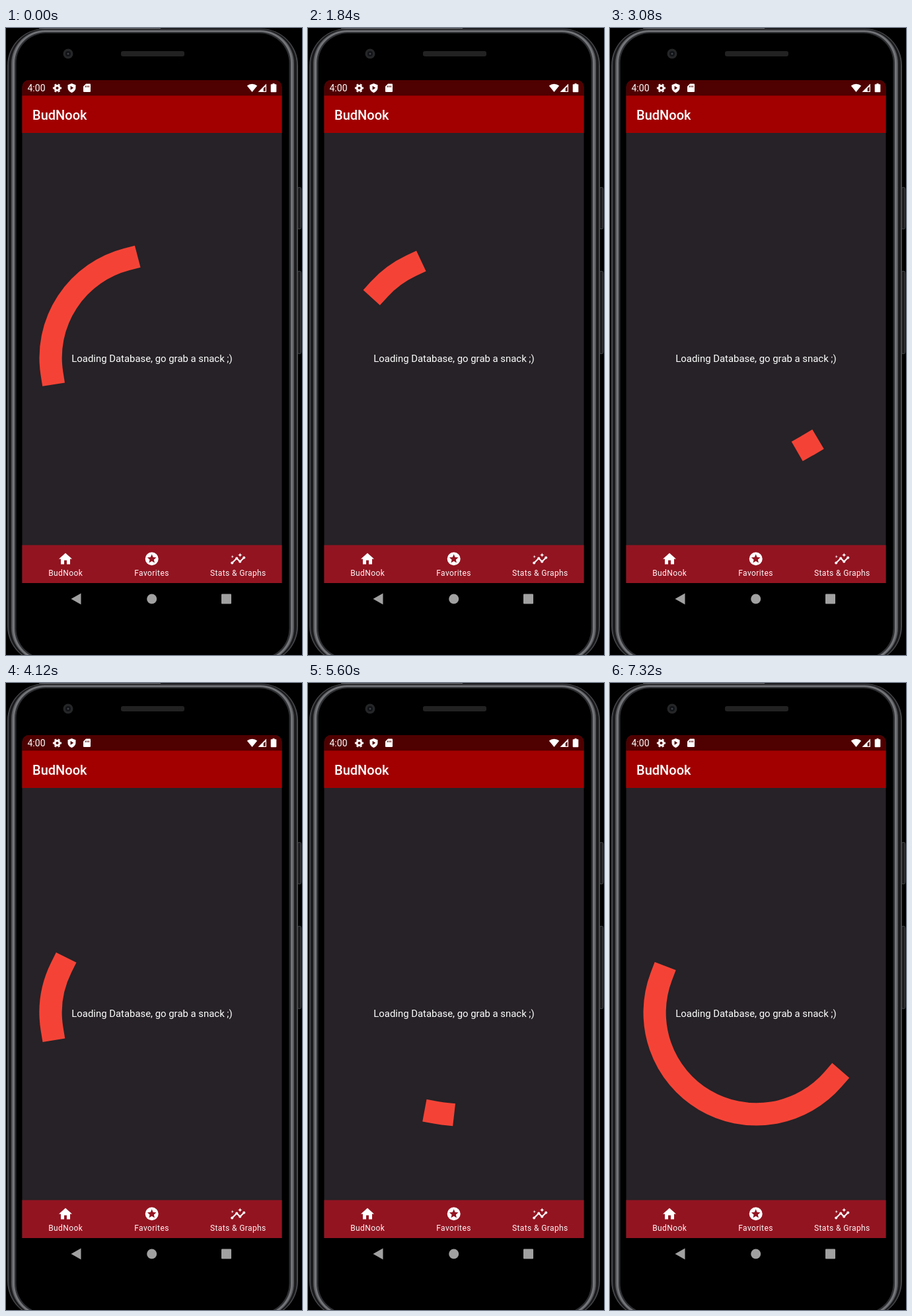
An HTML page that plays this animation: 448x950 px, repeating every 7.36 s.

```html
<!DOCTYPE html>
<html lang="en">
<head>
<meta charset="utf-8">
<title>Loading screen</title>
<style>
  html, body { margin: 0; width: 100%; height: 100%; overflow: hidden; background: #000; }
  svg { display: block; width: 448px; height: 950px; }
  text { font-family: Roboto, "Noto Sans", sans-serif; fill: #fff; }
  .title { font-size: 20px; font-weight: 500; }
  .message { font-size: 14.9px; text-anchor: middle; }
  .tabs text { font-size: 12px; letter-spacing: .0333em; text-anchor: middle; fill: #fdf6f7; }
  .tabs path, .tabs circle { fill: #fff; }
</style>
</head>
<body>
<svg viewBox="0 0 448 950">
  <defs>
    <clipPath id="screen"><path d="M24.5 841V89a10 10 0 0 1 10-10H407.500a10 10 0 0 1 10 10V841z"/></clipPath>
  </defs>

  <!-- phone body: nested bands of the metal rim -->
  <g fill="#1d1d1f" stroke="#4a4b4f">
    <rect x="441.5" y="241.5" width="5" height="63" rx="2"/>
    <rect x="441.5" y="368.5" width="5" height="125" rx="2"/>
  </g>
  <rect x="50" y="0" width="184" height="1" fill="#55575b"/>
  <rect x="2" y="1" width="440" height="961" rx="56" fill="#48494d"/>
  <rect x="4" y="2" width="436" height="959" rx="54" fill="#1b1b1d"/>
  <rect x="8" y="3" width="428" height="957" rx="51" fill="#55575b"/>
  <rect x="10" y="4" width="424" height="955" rx="49" fill="#737579"/>
  <rect x="13" y="6" width="418" height="951" rx="47" fill="#2f3033"/>
  <rect x="15.500" y="8" width="413" height="947" rx="45" fill="#000"/>

  <rect x="174" y="35" width="96" height="8" rx="3" fill="#222223"/>
  <circle cx="94" cy="39" r="7.5" fill="#252628"/>
  <circle cx="94" cy="39" r="4" fill="#111316"/>
  <circle cx="94" cy="39" r="1.5" fill="#3d4148"/>

  <!-- app screen -->
  <g clip-path="url(#screen)">
    <rect x="24" y="79" width="394" height="762" fill="#262227"/>
    <rect x="24" y="79" width="394" height="24" fill="#4f0000"/>
    <rect x="24" y="102.500" width="394" height="56.500" fill="#a20000"/>
    <rect x="24" y="783.500" width="394" height="57.500" fill="#931421"/>
  </g>

  <!-- status bar -->
  <text x="32.5" y="96" font-size="14">4:00</text>
  <g fill="#fff">
    <circle cx="77.5" cy="91" r="3.6" fill="none" stroke="#fff" stroke-width="3"/>
    <circle cx="77.5" cy="91" r="5.7" fill="none" stroke="#fff" stroke-width="1.8"
      pathLength="12" stroke-dasharray="1" stroke-dashoffset=".5"/>
    <path fill-rule="evenodd" d="M99.5 84l6 2.3v4.2c0 3.3-2.5 6.3-6 7.5-3.5-1.2-6-4.2-6-7.5v-4.2zM97.6 87.8v6l4.6-3z"/>
    <path fill-rule="evenodd" d="M121 84.5h6a1 1 0 0 1 1 1V96a1 1 0 0 1-1 1h-9a1 1 0 0 1-1-1v-7.5zM120 87.5v2.2h1.2v-2.2zM122.4 87.5v2.2h1.2v-2.2zM124.8 87.5v2.2h1.2v-2.2z"/>
    <path d="M372.5 97l-7.7-9.5a12.2 12.2 0 0 1 15.4 0z"/>
    <path fill-rule="evenodd" d="M394 84.5V97h-12.5zM392.7 88.5l-3 3V95.7h3z"/>
    <path d="M403.5 84h3v1.3h2a.8.8 0 0 1 .8.8V96.5a.8.8 0 0 1-.8.8h-7a.8.8 0 0 1-.8-.8V86.1a.8.8 0 0 1 .8-.8h2z"/>
  </g>
  <text class="title" x="40" y="139">BudNook</text>

  <!-- spinner and message -->
  <path id="arc" fill="none" stroke="#f44336" stroke-width="34.2" stroke-linecap="square"/>
  <text class="message" x="221" y="505.5">Loading Database, go grab a snack ;)</text>

  <!-- bottom tabs -->
  <g class="tabs">
    <path transform="translate(78 792.5)" d="M10 20v-6h4v6h5v-8h3L12 3 2 12h3v8z"/>
    <path transform="translate(208.7 792.3)" fill-rule="evenodd"
      d="M12 2a10 10 0 1 0 0 20 10 10 0 1 0 0-20zM16.23 18L12 15.45 7.77 18l1.12-4.81-3.73-3.23 4.92-.42L12 5l1.92 4.53 4.92.42-3.73 3.23z"/>
    <g transform="translate(339.2 792.5)">
      <polyline points="3,18 10,11 15,16 21,10" fill="none" stroke="#fff" stroke-width="2"/>
      <circle cx="3" cy="18" r="2"/>
      <circle cx="10" cy="11" r="2"/>
      <circle cx="15" cy="16" r="2"/>
      <circle cx="21" cy="10" r="2"/>
      <path d="M15 9l.94-2.07L18 6l-2.06-.93L15 3l-.92 2.07L12 6l2.08.93zM3.5 11L4 9l2-.5L4 8l-.5-2L3 8l-2 .5L3 9z"/>
    </g>
    <text x="90.2" y="830">BudNook</text>
    <text x="220.5" y="830">Favorites</text>
    <text x="351.3" y="830">Stats &amp; Graphs</text>
  </g>

  <!-- system navigation -->
  <g fill="#a1a1a1">
    <path d="M98.5 865L113.5 856.5V873.5z"/>
    <circle cx="220.7" cy="865" r="7.5"/>
    <rect x="326" y="857.5" width="15" height="15" rx="1"/>
  </g>
</svg>
<script>
  const LOOP = 7360, STEP = 40;
  const CYCLE = 4000 / 3, SPIN = 40000 / 9;
  const START_PHASE = .72, START_ANGLE = 10.6;
  const CX = 221.5, CY = 499.5, RADIUS = 153.9;
  // Five picture steps span twelve ticks of a 60 Hz display, unevenly.
  const TICKS = [0, 1, 4, 6, 9];
  const arc = document.getElementById('arc');

  // cubic-bezier(.4, 0, .2, 1), solved by bisection
  function ease(x) {
    if (x <= 0) return 0;
    if (x >= 1) return 1;
    let lo = 0, hi = 1;
    for (let i = 0; i < 24; i++) {
      const s = (lo + hi) / 2;
      if (s * (1.2 - 1.8 * s + 1.6 * s * s) < x) lo = s; else hi = s;
    }
    return lo * lo * (3 - 2 * lo);
  }

  function point(deg) {
    const a = deg * Math.PI / 180;
    return (CX + RADIUS * Math.sin(a)).toFixed(3) + ' ' + (CY - RADIUS * Math.cos(a)).toFixed(3);
  }

  function draw(time) {
    const n = Math.floor(time / STEP);
    const ms = (Math.floor(n / 5) * 12 + TICKS[n % 5]) * 1000 / 60;
    const phase = (START_PHASE + ms / CYCLE) % 1;
    const base = START_ANGLE + 720 * ms / SPIN + 90 * phase;
    const tail = base + 270 * ease(2 * phase - 1);
    const head = Math.max(base + 270 * ease(2 * phase), tail + .1);
    const large = head - tail > 180 ? 1 : 0;
    arc.setAttribute('d', `M${point(tail)}A${RADIUS} ${RADIUS} 0 ${large} 1 ${point(head)}`);
  }

  const begin = performance.now();
  function tick() {
    draw((performance.now() - begin) % LOOP);
    requestAnimationFrame(tick);
  }
  draw(0);
  requestAnimationFrame(tick);
</script>
</body>
</html>
```
